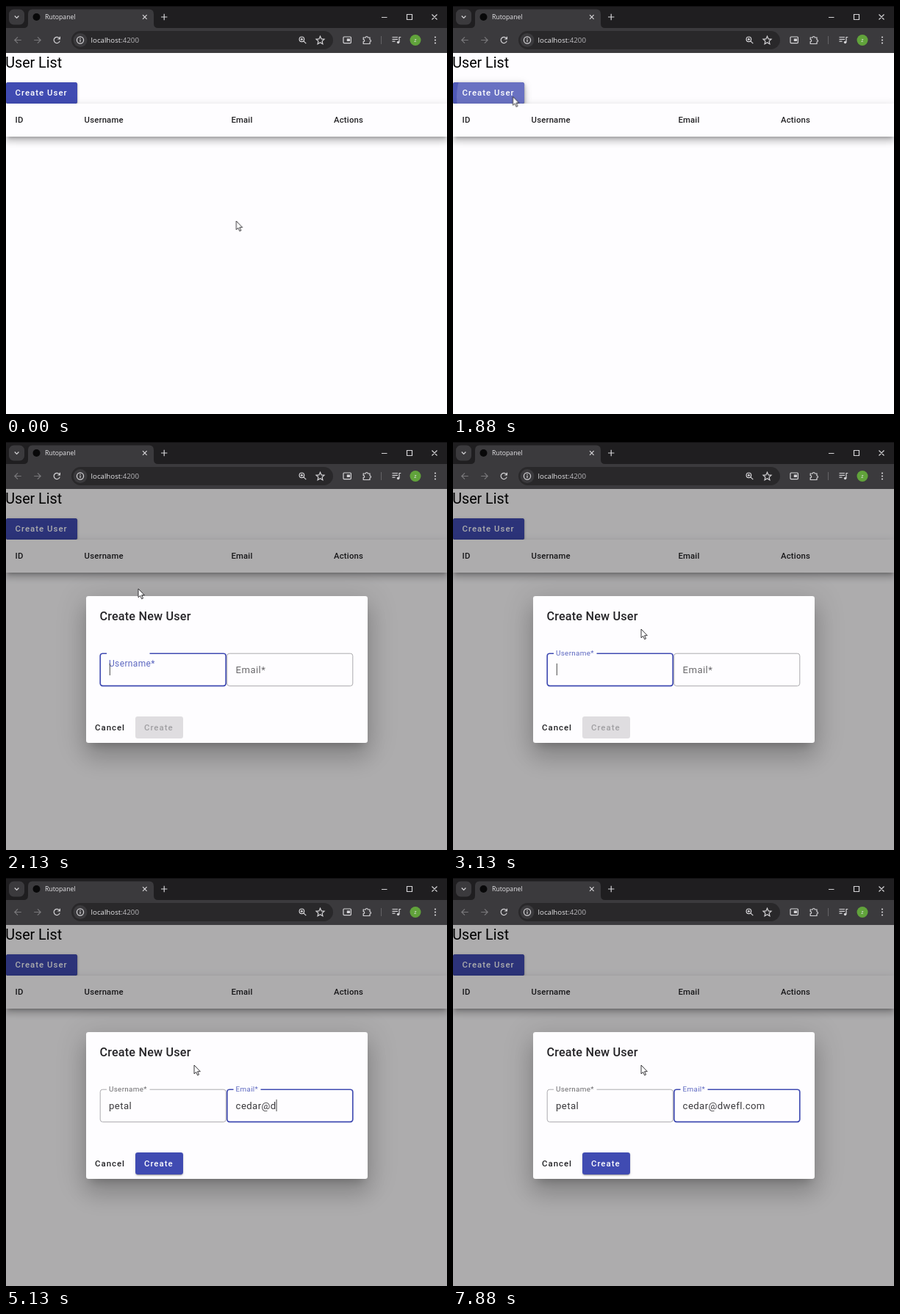
An HTML page that plays this animation: 600x556 px, repeating every 8000 ms.

```html
<!DOCTYPE html>
<html lang="en">
<head>
<meta charset="utf-8">
<title>User List</title>
<style>
  :root { --paper: #fefdff; --indigo: #404bb2; }
  html, body { margin: 0; width: 100%; height: 100%; overflow: hidden; }
  body { position: relative; background: var(--paper); font-family: Roboto, sans-serif; }
  svg, .layer { position: absolute; left: 0; top: 0; width: 600px; height: 556px; }
  .box { position: absolute; box-sizing: border-box; }
  text { white-space: pre; }

  .btn-text { font-size: 11.4px; font-weight: 500; letter-spacing: 1.02px; fill: #202023; }
  .raised {
    height: 29.5px; border-radius: 3.3px; background: var(--indigo);
    box-shadow: 0 2.5px 1px -1.6px #0003, 0 1.6px 1.6px #00000024, 0 1px 4px #0000001f;
  }
  #open { left: 0; top: 103.5px; width: 97px; overflow: hidden; }
  #open-shadow { left: 0; top: 103.5px; width: 97px; }
  #hover { inset: 0; background: #fff; opacity: 0; animation: hover 8s step-end infinite; }
  #ripple {
    left: 4.5px; top: -57px; width: 153px; height: 153px; border-radius: 50%;
    background: #fff; opacity: 0; animation: ripple 8s step-end infinite;
  }
  #lift {
    left: 0; top: 103.5px; width: 97px; height: 29.5px; border-radius: 3.3px; opacity: 0;
    box-shadow: 0 4px 4px -2.5px #0003, 0 6.5px 8px 1px #00000024, 0 2.5px 11px 1.6px #0000001f;
    animation: lift 8s step-end infinite;
  }
  #table {
    left: 0; top: 132.5px; width: 600px; height: 45.5px; background: var(--paper);
    box-shadow: 0 4px 4px -2.5px #0003, 0 6.5px 8px 1px #00000024, 0 2.5px 11px 1.6px #0000001f;
  }
  .head { font-size: 11.3px; font-weight: 500; letter-spacing: .2px; fill: #212023; }

  #backdrop { top: 64px; height: 492px; background: #000; opacity: 0; animation: dim 8s step-end infinite; }
  #dialog { transform-origin: 300px 310px; opacity: 0; animation: pop 8s step-end infinite; }
  #card {
    left: 108.5px; top: 210px; width: 383px; height: 200px; border-radius: 3.3px; background: var(--paper);
    box-shadow: 0 9px 12px -6px #0003, 0 20px 31px 2.5px #00000024, 0 7px 38px 6.5px #0000001f;
  }
  #create { left: 175.5px; top: 374px; width: 65px; }
  #create.off { background: #dfdde0; box-shadow: none; }
  #create-text { fill: #fff; }
  #create-text.off { fill: #a09fa2; }

  .field rect { fill: none; stroke: #a3a2a5; stroke-width: .9; }
  .field .notch { fill: var(--paper); stroke: none; visibility: hidden; }
  .field text { font-size: 13.15px; letter-spacing: .41px; fill: #39383b; }
  .field .label { fill: #6b6a6d; }
  .field .caret { stroke: #333; stroke-width: .9; visibility: hidden; }
  .field.focus rect { stroke: var(--indigo); stroke-width: 1.65; }
  .field.focus .notch { stroke: none; }
  .field.focus .label { fill: #5c67c0; }
  .field.float .notch { visibility: visible; }
  .field.float .label { transform: translateY(-24.3px) scale(.75); }
  .field.rising .label { transform: translateY(-9px) scale(.91); }
  .field.blink .caret { visibility: visible; }

  #cursor { overflow: visible; animation: move 8s step-end infinite; }

  .ui { font-family: "Open Sans", "Noto Sans", sans-serif; fill: #e6e5e8; }
  .line { fill: none; stroke: #d4d3d6; stroke-width: 1.2; }
  .faint { stroke: #79787b; }

  @keyframes hover { 0% { opacity: 0 } 15.625% { opacity: .08 } 25%, 100% { opacity: 0 } }
  @keyframes ripple { 0% { opacity: 0 } 23.5% { opacity: .15 } 25%, 100% { opacity: 0 } }
  @keyframes lift { 0% { opacity: 0 } 23.5% { opacity: 1 } 26.625%, 100% { opacity: 0 } }
  @keyframes dim { 0% { opacity: 0 } 25% { opacity: .23 } 26.625%, 100% { opacity: .32 } }
  @keyframes pop {
    0% { opacity: 0; transform: scale(.8) }
    25% { opacity: .65; transform: scale(.987) }
    26.625%, 100% { opacity: 1; transform: none }
  }
  @keyframes move {
    0% { transform: translate(313.3px, 293px) }
    1.625% { transform: translate(311.8px, 288.5px) }
    7.875% { transform: translate(300px, 279px) }
    9.375% { transform: translate(262px, 246px) }
    11% { transform: translate(200px, 197px) }
    12.5% { transform: translate(150px, 155px) }
    14.125% { transform: translate(115px, 134px) }
    15.625% { transform: translate(95px, 125px) }
    17.25% { transform: translate(86px, 123px) }
    18.75% { transform: translate(83px, 123px) }
    21.875% { transform: translate(81.5px, 123.5px) }
    25% { transform: translate(96.5px, 136.5px) }
    26.625% { transform: translate(180px, 200px) }
    28.125% { transform: translate(245px, 248px) }
    29.75%, 100% { transform: translate(256px, 255px) }
  }
</style>
</head>
<body>

<div class="layer">
  <div id="open-shadow" class="box raised"></div>
  <div id="lift" class="box"></div>
  <div id="open" class="box raised">
    <div id="hover" class="box"></div>
    <div id="ripple" class="box"></div>
  </div>
  <div id="table" class="box"></div>
  <svg>
    <text x="-.8" y="84" font-size="19.7">User List</text>
    <text class="btn-text" x="12.6" y="122.3" style="fill:#fff">Create User</text>
    <g class="head">
      <text x="12.6" y="159.3">ID</text>
      <text x="106.6" y="159.3">Username</text>
      <text x="306.4" y="159.3">Email</text>
      <text x="446" y="159.3">Actions</text>
    </g>
  </svg>
</div>

<div id="backdrop" class="layer"></div>

<div id="dialog" class="layer">
  <div id="card" class="box"></div>
  <div id="create" class="box raised off"></div>
  <svg>
    <text x="127.4" y="242.6" font-size="16.2" font-weight="500" letter-spacing=".2" fill="#252427">Create New User</text>
    <g id="user" class="field">
      <rect x="128.2" y="288.2" width="171" height="44.2" rx="3.3"/>
      <rect class="notch" x="137" y="286" width="58.5" height="5"/>
      <g transform="translate(140 315.3)">
        <text class="label">Username*</text>
        <text class="value"></text>
        <path class="caret" d="M1.3-13.5V2.7"/>
      </g>
    </g>
    <g id="email" class="field">
      <rect x="300.8" y="288.2" width="171" height="44.2" rx="3.3"/>
      <rect class="notch" x="309.5" y="286" width="37" height="5"/>
      <g transform="translate(312.6 315.3)">
        <text class="label">Email*</text>
        <text class="value"></text>
        <path class="caret" d="M1.3-13.5V2.7"/>
      </g>
    </g>
    <text class="btn-text" x="121" y="392.5">Cancel</text>
    <text id="create-text" class="btn-text off" x="188" y="392.5">Create</text>
  </svg>
</div>

<svg id="chrome">
  <path d="M0 0H600V64H0Z" fill="#3b3a3d"/>
  <path d="M0 0H600V30H0Z" fill="#1f1e20"/>
  <path d="M0 .5H600" stroke="#111012"/>
  <rect x="4" y="4.5" width="21" height="21" rx="6.5" fill="#3b3a3d"/>
  <path class="line" d="M11.8 13.5 14.6 16.3 17.4 13.5"/>
  <path d="M24 30Q30 30 30 24V11Q30 4.500 36 4.500H195Q201 4.500 201 11V24Q201 30 207 30Z" fill="#3b3a3d"/>
  <circle cx="41.500" cy="15" r="5" fill="#080809"/>
  <text class="ui" x="53" y="18.200" font-size="8.700">Rutopanel</text>
  <path class="line" d="M186 12.200 191.600 17.800M191.600 12.200 186 17.800M211 15H219.400M215.200 10.800V19.200"/>
  <path class="line" stroke-width="1" d="M511 15.500H518.500M545.500 11.500H552.500V18.500H545.500ZM579.500 11.500 586.500 18.500M586.500 11.500 579.500 18.500"/>

  <path class="line faint" d="M20.800 46.500H12M16 42.300 11.800 46.500 16 50.700M38.200 46.500H47M43 42.300 47.200 46.500 43 50.700"/>
  <path class="line" d="M72.800 44.300A4.100 4.100 0 1 0 73.200 47.600M73.400 41.800V45H70.200"/>
  <rect x="89" y="34" width="356" height="25" rx="12.500" fill="#29282a"/>
  <circle cx="101" cy="46.500" r="9.500" fill="#3b3a3d"/>
  <circle class="line" cx="101" cy="46.500" r="4.600"/>
  <path class="line" d="M101 45.800V49M101 43.700V44.900"/>
  <text class="ui" x="115.600" y="50.200" font-size="9.700">localhost<tspan fill="#bab9bc">:4200</tspan></text>

  <circle class="line" cx="402.400" cy="45.300" r="3.300"/>
  <path class="line" d="M404.900 47.800 408.300 51.200M400.600 45.300H404.200M402.400 43.500V47.100"/>
  <path class="line" d="M427.500 41.300 429.100 44.900 433 45.300 430.100 47.900 430.900 51.700 427.500 49.700 424.100 51.700 424.900 47.900 422 45.300 425.900 44.900Z"/>
  <rect class="line" x="459" y="42" width="10.400" height="8.600" rx="1"/>
  <path d="M463.800 44.500H468V48H463.800Z" fill="#d4d3d6"/>
  <path class="line" d="M486.200 43H489.300A1.500 1.500 0 0 1 492.300 43H495V46A1.500 1.500 0 0 1 495 49V51.500H486.200V48.700A1.500 1.500 0 0 0 486.200 45.700Z"/>
  <path d="M510.500 41V52" stroke="#646366"/>
  <path class="line" d="M525.500 42.500H533M525.500 45.300H533M525.500 48.100H529.500M535 49.500V42.500H537.300"/>
  <circle cx="533.600" cy="49.500" r="1.700" fill="#d4d3d6"/>
  <circle cx="557" cy="46.500" r="7.500" fill="#61a33b"/>
  <text class="ui" x="557" y="49" font-size="7" text-anchor="middle">z</text>
  <g fill="#d4d3d6">
    <circle cx="584" cy="42.500" r="1.100"/>
    <circle cx="584" cy="46.500" r="1.100"/>
    <circle cx="584" cy="50.500" r="1.100"/>
  </g>
</svg>

<svg id="cursor">
  <path d="M0 0V11.800L2.700 9.400 4.600 13.800 6.500 13 4.600 8.700H8.300Z" fill="#fff" stroke="#222124" stroke-width=".9"/>
</svg>

<script>
  const LOOP = 8000;
  const RISE = 130;       // time a label takes to float up
  const BLINK = 500;
  const LAG = 121;        // keys are pressed a little before they show
  const ERASE = [6130, 6500];

  const $ = id => document.getElementById(id);

  // In keys, "<" is a backspace.
  const fields = [
    { el: $("user"), from: 2130, to: 4000, keys: "petal",
      times: [3380, 3500, 3630, 3750, 3880] },
    { el: $("email"), from: 4000, to: LOOP, keys: "cedar@dwfel.<<<<efl.com",
      times: [4250, 4380, 4500, 4630, 4750, 4880, 5130, 5250, 5380, 5500, 5630, 5880,
              6130, 6250, 6380, 6500, 6630, 6750, 6880, 7130, 7250, 7380, 7500] }
  ];

  function typed({ keys, times }, t) {
    let text = "";
    times.forEach((at, i) => {
      if (at <= t) text = keys[i] === "<" ? text.slice(0, -1) : text + keys[i];
    });
    return text;
  }

  function drawField(field, t) {
    const { el, from, to, times } = field;
    const value = el.querySelector(".value");
    const text = typed(field, t);
    if (value.textContent !== text) value.textContent = text;

    const focus = t >= from && t < to;
    const last = Math.max(from, ...times.filter(at => at <= t));
    const erasing = t >= ERASE[0] && t < ERASE[1];
    const lit = Math.floor((t - last + LAG) / BLINK) % 2 === 0;
    const set = (name, on) => el.classList.toggle(name, on);
    set("focus", focus);
    set("float", t >= from);
    set("rising", t >= from && t < from + RISE - 10);
    set("blink", focus && lit && !erasing);

    const width = text ? value.getComputedTextLength() - .8 : 0;
    el.querySelector(".caret").setAttribute("transform", `translate(${width} 0)`);
    return text;
  }

  let start;
  function frame(now) {
    start ??= now;
    const t = (now - start) % LOOP;
    const [user, email] = fields.map(field => drawField(field, t));
    const valid = user && /^[^@]+@\w+(\.\w+)*$/.test(email);
    for (const id of ["create", "create-text"]) $(id).classList.toggle("off", !valid);
    requestAnimationFrame(frame);
  }
  requestAnimationFrame(frame);
</script>
</body>
</html>
```
